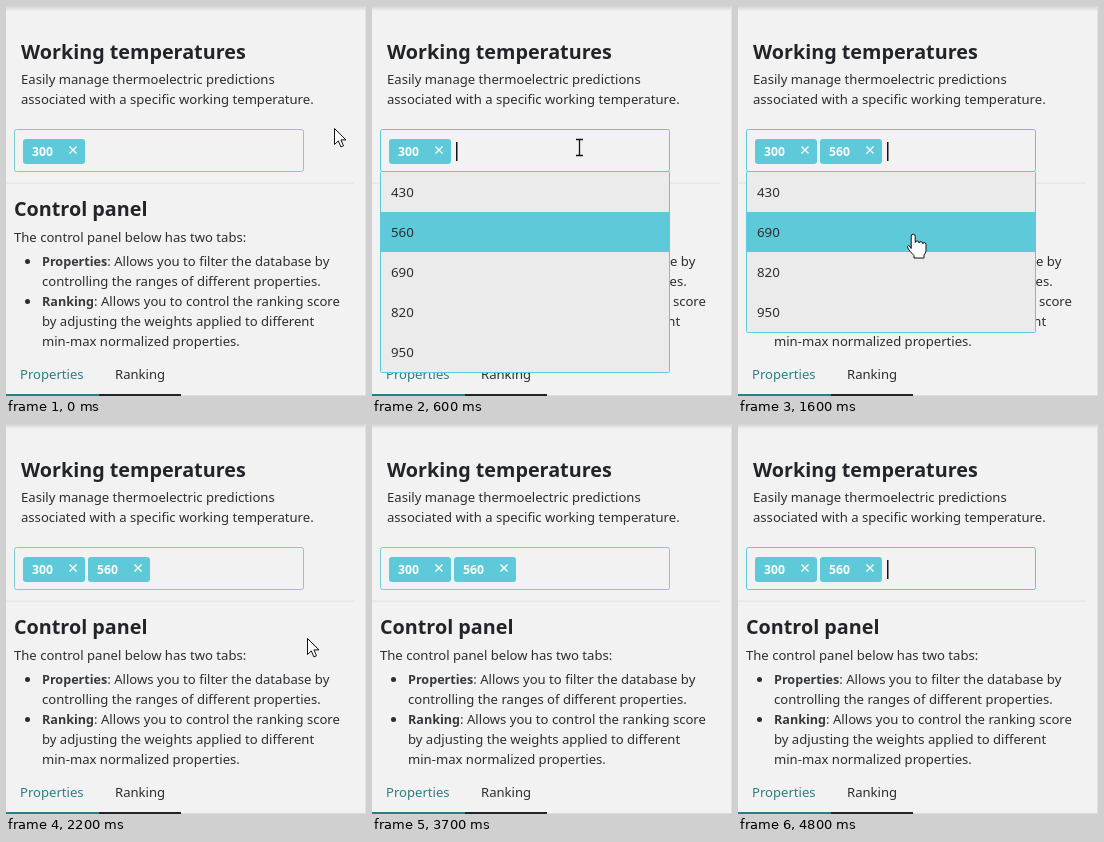
These frames come from a looping animation (360 by 390 pixels, 4900 ms). An HTML page:

```html
<!DOCTYPE html>
<html lang="en">
<head>
<meta charset="utf-8">
<title>Working temperatures</title>
<style>
html, body { margin: 0; width: 100%; height: 100%; overflow: hidden; background: #f2f2f2; }
svg { display: block; width: 360px; height: 390px; }
text { font: 13.1px "Noto Sans", "Open Sans", sans-serif; fill: #2b2d31; white-space: pre; }
.title { font-size: 19.75px; font-weight: 700; fill: #212529; }
.term { font-size: 12.6px; font-weight: 700; fill: #363a40; }
.active { fill: #2a7f84; }
.accent { fill: #5ec9d8; }
.outline { fill: none; stroke: #5ec9d8; }
.idle { stroke: #7accd4; }
.tag text { font-size: 12.2px; font-weight: 700; fill: #fff; }
.tag path { stroke: #fff; stroke-width: 1.4; }
.option { font-size: 13.3px; }
#cursor path { fill: #fff; stroke: #111; stroke-linejoin: round; }
#cursor .beam { fill: none; stroke-width: 1.3; }
</style>
</head>
<body>
<svg viewBox="0 0 360 390">
  <defs>
    <linearGradient id="shade" x2="0" y2="1">
      <stop stop-color="#d2d2d2"/>
      <stop offset="1" stop-color="#f2f2f2"/>
    </linearGradient>
  </defs>
  <rect width="360" height="390" fill="#f2f2f2"/>
  <rect width="360" height="5" fill="url(#shade)"/>
  <rect x="359" width="1" height="390" fill="#e2e2e2"/>

  <text class="title" x="15" y="53">Working temperatures</text>
  <text x="15" y="78">Easily manage thermoelectric predictions</text>
  <text x="15" y="98">associated with a specific working temperature.</text>

  <rect y="176.5" width="348" height="1.5" fill="#e7e7e7"/>
  <text class="title" x="8" y="210">Control panel</text>
  <text x="8" y="236">The control panel below has two tabs:</text>
  <circle cx="21.5" cy="255.5" r="2.5" fill="#2b2d31"/>
  <text x="36" y="260"><tspan class="term">Properties</tspan>: Allows you to filter the database by</text>
  <text x="36" y="280">controlling the ranges of different properties.</text>
  <circle cx="21.5" cy="295.5" r="2.5" fill="#2b2d31"/>
  <text x="36" y="300"><tspan class="term">Ranking</tspan>: Allows you to control the ranking score</text>
  <text x="36" y="320">by adjusting the weights applied to different</text>
  <text x="36" y="340">min-max normalized properties.</text>

  <text class="active" x="14" y="373">Properties</text>
  <text x="109" y="373">Ranking</text>
  <rect x="175" y="389" width="185" height="1" fill="#dcdcdc"/>
  <rect class="active" y="388" width="93" height="2"/>
  <rect x="93" y="388" width="82" height="2" fill="#212529"/>

  <rect id="field" x="8.5" y="123.5" width="289" height="42" rx="2"/>
  <g id="tags"></g>
  <rect id="caret" y="136" width="1.5" height="19" fill="#111"/>
  <g id="menu">
    <rect id="panel" x="8" y="166" width="290" fill="#ebebeb"/>
    <rect id="hover" class="accent" x="9" width="288" height="40"/>
    <g id="options"></g>
    <rect id="frame" class="outline" x="8.5" y="165.5" width="289" rx="1"/>
  </g>
  <g id="cursor">
    <path class="arrow" d="M0 0V16L3.8 12.4 6.4 18.4 9 17.3 6.4 11.4H11.5Z"/>
    <path class="beam" d="M-3.5-8H3.5M0-8V8M-3.5 8H3.5"/>
    <path class="hand" d="M-2.3 14V1.7a2 2 0 0 1 4 0V8q0-1.5 2-1.5t2 2q0-1.3 1.8-1.3t1.9 2q.2-1.2 1.5-1.2t1.6 2V16q0 2.5-2 4.5V23.5H.5V21Q-3.5 17.5-5.7 13.5q-.8-1.8.6-2.3T-2.3 14Z"/>
  </g>
</svg>
<script>
const LOOP = 4900, STEP = 100;
const ROW = 40, MENU_TOP = 166, TAG_GAP = 65;
const OPEN = 500, PICK = 1400, CLOSE = 2200, LEAVE = 3600, REFOCUS = 4500;
const temps = [430, 560, 690, 820, 950];
// Pointer path: time, x, y
const path = [
  [0, 328, 122], [100, 324, 123], [400, 207, 141], [700, 207, 141],
  [900, 183, 190], [1100, 183, 190], [1300, 176, 228], [1800, 175, 228],
  [2100, 301, 214], [2300, 301, 214], [2600, 189, 216], [3100, 189, 216],
  [3500, 333, 190]
];

const $ = id => document.getElementById(id);
const show = (el, on) => el.setAttribute("visibility", on ? "visible" : "hidden");
const within = (v, from, to) => v >= from && v < to;

function pointerAt(t) {
  const i = path.findIndex(p => p[0] > t);
  if (i < 0) return path[path.length - 1].slice(1);
  const [t0, x0, y0] = path[i - 1], [t1, x1, y1] = path[i];
  const k = (t - t0) / (t1 - t0);
  return [x0 + (x1 - x0) * k, y0 + (y1 - y0) * k];
}

function tag(value, i) {
  return `<g class="tag" transform="translate(${17 + i * TAG_GAP} 133)">
    <rect class="accent" width="62" height="25" rx="3"/>
    <text x="9" y="17">${value}</text>
    <path d="M46.5 7.5l7 7m0-7l-7 7"/></g>`;
}

function option(value, i) {
  return `<text class="option" x="19" y="${MENU_TOP + 25 + i * ROW}">${value}</text>`;
}

function draw(t) {
  const tags = t < PICK ? [300] : [300, 560];
  const left = temps.filter(v => !tags.includes(v));
  const open = within(t, OPEN, CLOSE);
  const focused = open || t >= REFOCUS;
  const height = left.length * ROW;
  const [x, y] = pointerAt(t);
  const overField = within(x, 8, 298);
  const overMenu = open && overField && within(y, MENU_TOP, MENU_TOP + height);
  const row = overMenu ? Math.floor((y - MENU_TOP) / ROW) : 1;

  $("field").setAttribute("class", focused ? "outline" : "outline idle");
  $("tags").innerHTML = tags.map(tag).join("");
  $("caret").setAttribute("x", 19 + tags.length * TAG_GAP);
  show($("caret"), focused);

  $("options").innerHTML = left.map(option).join("");
  $("panel").setAttribute("height", height);
  $("frame").setAttribute("height", height + 1);
  $("hover").setAttribute("y", MENU_TOP + row * ROW);
  show($("menu"), open);

  const overInput = overField && within(y, 123, MENU_TOP);
  const shape = overMenu ? "hand" : overInput ? "beam" : "arrow";
  $("cursor").setAttribute("transform", `translate(${Math.round(x) + .5} ${Math.round(y) + .5})`);
  for (const el of $("cursor").children) {
    show(el, t < LEAVE && el.getAttribute("class") === shape);
  }
}

const start = performance.now();
let last = -1;
function tick() {
  const t = Math.floor((performance.now() - start) % LOOP / STEP) * STEP;
  if (t !== last) draw(last = t);
  requestAnimationFrame(tick);
}
tick();
</script>
</body>
</html>
```
